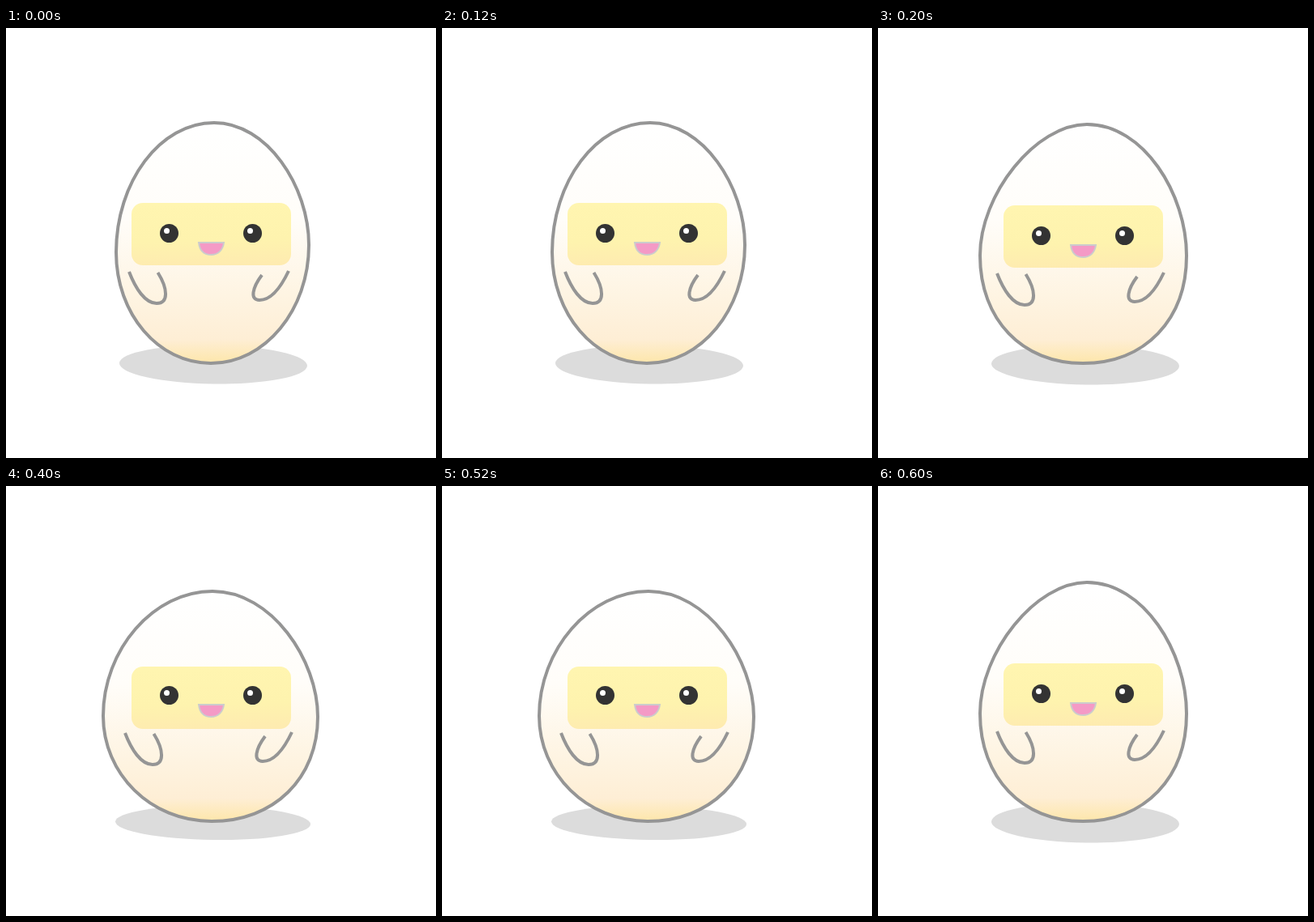
Recreate the animation shown at these times as an HTML page with a canvas. Size 531 by 531 pixels, loop 0.8 s.

```html
<!DOCTYPE html>
<html lang="en">
<head>
<meta charset="utf-8">
<title>Bouncing egg</title>
<style>
html, body { margin: 0; width: 100%; height: 100%; overflow: hidden; background: #fff; }
canvas { display: block; width: 531px; height: 531px; }
</style>
</head>
<body>
<canvas id="stage"></canvas>
<script>
const SIZE = 531, STEP = 200;
const canvas = document.getElementById('stage');
const ratio = window.devicePixelRatio || 1;
canvas.width = canvas.height = SIZE * ratio;
const ctx = canvas.getContext('2d');
ctx.scale(ratio, ratio);

const OUTLINE = '#959595';

const tall = {
  egg: 'M257 117C322 117 374 195 374 268C374 348 320 414 253 414C188 414 136 353 136 277C136 190 190 117 257 117Z',
  top: 117, shadow: [256, 415.5, 116, 24], band: 216, face: 0, arms: [0, 0, 0]
};
const mid = {
  egg: 'M258 119C328 119 381 205 381 281C381 360 330 414 253 414C178 414 126 360 126 281C126 205 195 119 258 119Z',
  top: 119, shadow: [256, 416, 116, 24.5], band: 219, face: 3, arms: [-5, 4, 2]
};
const squat = {
  egg: 'M255 130C328 130 385 215 385 285C385 361 331 414 254 414C178 414 120 355 120 284C120 202 182 130 255 130Z',
  top: 130, shadow: [255.5, 416, 120.5, 21], band: 223, face: 5, arms: [-5, 4, 4]
};
const poses = [tall, mid, squat, mid];

const leftArm = new Path2D('M152 301C160 322 172 340 186 340C201 340 200 322 187.5 302');
const rightArm = new Path2D('M349 300C341 317 329 336 313 336C301 336 304 321 316 305');
const mouth = new Path2D('M238 265H269C268 274 262 280 253.5 280C244 280 239 274 238 265Z');

function gradient(y0, y1, stops) {
  const g = ctx.createLinearGradient(254, y0, 256, y1);
  stops.forEach(([at, color]) => g.addColorStop(at, color));
  return g;
}

function disc(x, y, r, color) {
  ctx.fillStyle = color;
  ctx.beginPath();
  ctx.arc(x, y, r, 0, Math.PI * 2);
  ctx.fill();
}

function strokeAt(path, dx, dy) {
  ctx.save();
  ctx.translate(dx, dy);
  ctx.stroke(path);
  ctx.restore();
}

function drawShadow([x, y, rx, ry]) {
  ctx.fillStyle = '#dcdcdc';
  ctx.beginPath();
  ctx.ellipse(x, y, rx, ry, 0.014, 0, Math.PI * 2);
  ctx.fill();
}

function drawFace(pose) {
  ctx.fillStyle = gradient(pose.band, pose.band + 77,
    [[0, '#fff5b0'], [0.6, '#fef3ae'], [1, '#feebb0']]);
  ctx.beginPath();
  ctx.roundRect(155, pose.band, 197, 77, 14);
  ctx.fill();

  ctx.save();
  ctx.translate(0, pose.face);
  for (const x of [201.5, 304.5]) {
    disc(x, 253.5, 11.5, '#333');
    disc(x - 3, 250.5, 3.5, '#fff');
  }
  ctx.fillStyle = '#f49ac6';
  ctx.fill(mouth);
  ctx.strokeStyle = '#ccc';
  ctx.lineWidth = 2;
  ctx.stroke(mouth);
  ctx.restore();
}

function draw(pose) {
  ctx.fillStyle = '#fff';
  ctx.fillRect(0, 0, SIZE, SIZE);
  drawShadow(pose.shadow);

  const egg = new Path2D(pose.egg);
  ctx.fillStyle = gradient(pose.top, 414,
    [[0, '#fff'], [0.4, '#fffdf9'], [0.72, '#fef4e2'], [0.9, '#feeed5'], [1, '#fde6aa']]);
  ctx.fill(egg);
  ctx.strokeStyle = OUTLINE;
  ctx.lineWidth = 4;
  ctx.stroke(egg);

  drawFace(pose);

  const [left, right, dy] = pose.arms;
  ctx.strokeStyle = OUTLINE;
  ctx.lineWidth = 4;
  strokeAt(leftArm, left, dy);
  strokeAt(rightArm, right, dy);
}

const start = performance.now();
function tick() {
  const time = Math.max(0, performance.now() - start);
  draw(poses[Math.floor(time / STEP) % poses.length]);
  requestAnimationFrame(tick);
}
tick();
</script>
</body>
</html>
```
